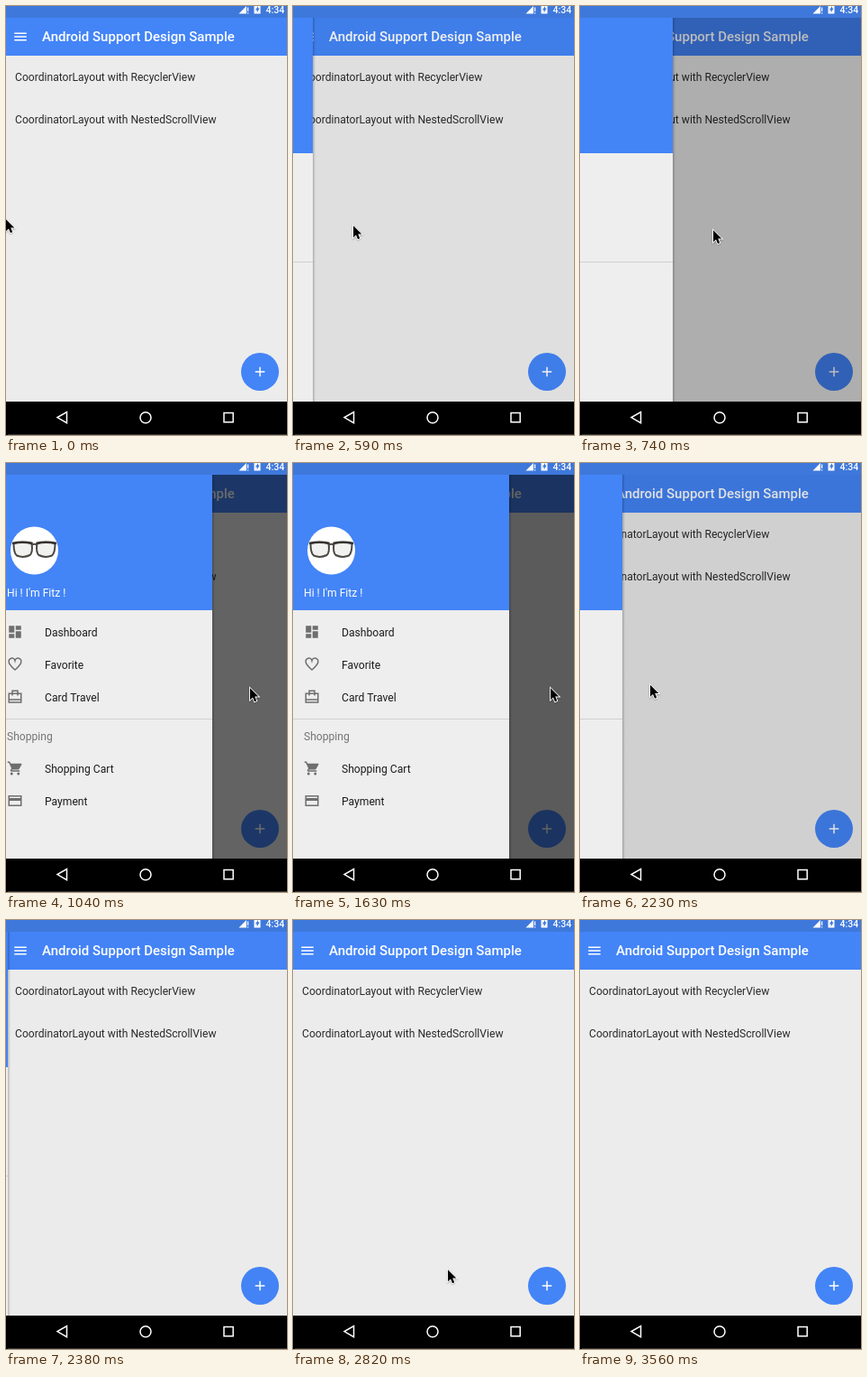
An HTML page with a canvas for the animation above (3580 ms loop, 312 px wide and 475 px high).

```html
<!DOCTYPE html>
<html lang="en">
<head>
<meta charset="utf-8">
<title>Navigation drawer</title>
<style>
html, body { margin: 0; width: 100%; height: 100%; overflow: hidden; background: #000; }
canvas { display: block; width: 312px; height: 475px; }
</style>
</head>
<body>
<canvas id="stage"></canvas>
<script>
const W = 312, H = 475, LOOP = 3580, DRAWER = 240;
const BLUE = '#4384f7', BAR = '#3f78db', PAGE = '#ececec', GREY = '#6e6e6e';
const canvas = document.getElementById('stage');
const ctx = canvas.getContext('2d');
const dpr = window.devicePixelRatio || 1;
canvas.width = W * dpr;
canvas.height = H * dpr;

// Each pose holds until the next: time, drawer edge, cursor x and y (none = hidden)
const poses = [
  [0, 0, -1, 235], [450, 0, 16, 239], [590, 22, 66, 242], [740, 103, 147, 247],
  [890, 182, 225, 248], [1040, 229, 270, 248], [1190, 240, 277, 249],
  [1340, 240, 292, 249], [1480, 240, 293, 249], [1630, 240, 285, 248],
  [1780, 189, 222, 248], [1930, 112, 144, 247], [2080, 77, 108, 246],
  [2230, 47, 77, 244.5], [2380, 2], [2530, 0], [2820, 0, 171, 386],
  [2970, 0, 230, 443], [3120, 0]
];

// Icons on a 24 unit grid: filled part and stroked part
const icons = {
  dashboard: { fill: 'M3 3h8v10H3zM3 15h8v6H3zM13 11h8v10h-8zM13 3h8v6h-8z' },
  heart: { line: 'M12 20C6 14.6 3 11.9 3 8.5A4.5 4.5 0 0 1 12 6.3A4.5 4.5 0 0 1 21 8.5C21 11.9 18 14.6 12 20z' },
  travel: { line: 'M3 7h18v13H3zM3 16h18M8 10V3h8v7' },
  cart: {
    fill: 'M5 5h16q1.5 .2 .8 1.6l-3.6 6.4q-.6 1-1.8 1H8L5 6zM5 20a2 2 0 1 0 4 0a2 2 0 1 0-4 0M15 20a2 2 0 1 0 4 0a2 2 0 1 0-4 0',
    line: 'M1 3h2.6l4.2 9-1.7 3q-.4 1 .9 1h12'
  },
  payment: { line: 'M3 5h18v14H3z', fill: 'M3 8h18v4H3z' }
};

const items = [
  ['dashboard', 'Dashboard', 187], ['heart', 'Favorite', 223], ['travel', 'Card Travel', 259],
  ['cart', 'Shopping Cart', 338], ['payment', 'Payment', 374]
];

function rect(x, y, w, h, color) {
  ctx.fillStyle = color;
  ctx.fillRect(x, y, w, h);
}

function disc(x, y, r, color) {
  ctx.fillStyle = color;
  ctx.beginPath();
  ctx.arc(x, y, r, 0, Math.PI * 2);
  ctx.fill();
}

function text(str, x, y, color, size = 12.12, weight = 400) {
  ctx.font = `${weight} ${size}px Roboto, sans-serif`;
  ctx.fillStyle = color;
  ctx.fillText(str, x, y);
}

function fill(d, color) {
  ctx.fillStyle = color;
  ctx.fill(new Path2D(d));
}

function line(d, color, width) {
  ctx.strokeStyle = color;
  ctx.lineWidth = width;
  ctx.stroke(new Path2D(d));
}

function at(x, y, scale, draw) {
  ctx.save();
  ctx.translate(x, y);
  ctx.scale(scale, scale);
  draw();
  ctx.restore();
}

function drawStatus() {
  rect(0, 0, W, 13, BAR);
  fill('M258.5 8.5L267 0V8.5z', '#fff');
  rect(268, 1.5, 1.2, 4.5, '#fff');
  rect(268, 7.2, 1.2, 1.3, '#fff');
  rect(275.5, 0, 7, 8.5, '#fff');
  fill('M280 0L276.8 4.4h1.9v3.2L281.6 2.6h-1.6z', BAR);
  text('4:34', 288.5, 8, '#fff', 10.5, 500);
}

function drawPage() {
  rect(0, 13, W, 425, PAGE);
  rect(0, 13, W, 42, BLUE);
  for (const y of [29.5, 33.25, 37]) rect(9.25, y, 13.5, 1.5, '#fff');
  text('Android Support Design Sample', 40, 39, '#fff', 15, 500);
  text('CoordinatorLayout with RecyclerView', 10, 83, '#2a2a2a');
  text('CoordinatorLayout with NestedScrollView', 10, 129.5, '#2a2a2a');
  disc(282, 405, 21, BLUE);
  line('M276.7 405h10.6M282 399.7v10.6', '#fff', 1.5);
}

function drawAvatar() {
  disc(42.5, 97, 26.5, '#fff');
  at(42.5, 96, 1, () => {
    const lens = 'M-23 -7Q-13 -9.5 -3 -7Q-1.5 3 -5 6Q-12 9.5 -19.5 6.5Q-23 4 -23 -7z';
    for (const side of [1, -1]) {
      ctx.save();
      ctx.scale(side, 1);
      fill(lens, '#f1f1ef');
      line(lens, '#4b4743', 2);
      line('M-24.5 -7Q-13 -9.5 -2 -7', '#35322f', 2.4);
      ctx.restore();
    }
    line('M-3 -5Q0 -7.5 3 -5', '#4b4743', 2);
  });
}

function drawDrawer(edge) {
  ctx.save();
  ctx.translate(edge - DRAWER, 0);
  rect(0, 13, DRAWER, 425, '#eeeeee');
  rect(0, 13, DRAWER, 150, BLUE);
  drawAvatar();
  text("Hi ! I'm Fitz !", 12, 147.5, '#fff');
  for (const [icon, label, y] of items) {
    at(12, y - 9, 0.75, () => {
      if (icons[icon].fill) fill(icons[icon].fill, GREY);
      if (icons[icon].line) line(icons[icon].line, GREY, 2);
    });
    text(label, 54, y + 4.5, '#1c1c1c');
  }
  rect(0, 283, DRAWER, 1, '#d0d0d0');
  text('Shopping', 12, 306.5, '#747474');
  ctx.restore();

  const shade = ctx.createLinearGradient(edge, 0, edge + 3, 0);
  shade.addColorStop(0, 'rgba(0,0,0,.22)');
  shade.addColorStop(1, 'rgba(0,0,0,0)');
  rect(edge, 13, 3, 425, shade);
}

function drawNav() {
  rect(0, 438, W, 37, '#000');
  rect(2, 474, 310, 1, '#333');
  line('M67.5 449.6V461.6L57 455.6z', '#fff', 1.5);
  line('M149 455.7a6 6 0 1 0 12 0a6 6 0 1 0-12 0', '#fff', 1.5);
  line('M242 450.6h10.2v10.2h-10.2z', '#fff', 1.5);
}

function drawCursor(x, y) {
  const arrow = 'M1 1.3V14.2L4 11.4L6 16.2L8.2 15.2L6.2 10.6H10.3z';
  at(x, y, 1, () => {
    ctx.shadowColor = 'rgba(0,0,0,.35)';
    ctx.shadowBlur = 1.5 * dpr;
    ctx.shadowOffsetY = 0.7 * dpr;
    line(arrow, '#fff', 1.8);
    ctx.shadowColor = 'transparent';
    fill(arrow, '#000');
  });
}

function draw(now) {
  const t = now % LOOP;
  const [, edge, x, y] = poses.findLast(p => p[0] <= t);
  ctx.setTransform(dpr, 0, 0, dpr, 0, 0);
  drawPage();
  if (edge > 0) {
    rect(0, 13, W, 425, `rgba(0,0,0,${0.61 * edge / DRAWER})`);
    drawDrawer(edge);
  }
  drawStatus();
  drawNav();
  if (x !== undefined) drawCursor(x, y);
}

const start = performance.now();
function tick() {
  draw(performance.now() - start);
  requestAnimationFrame(tick);
}
tick();
</script>
</body>
</html>
```
